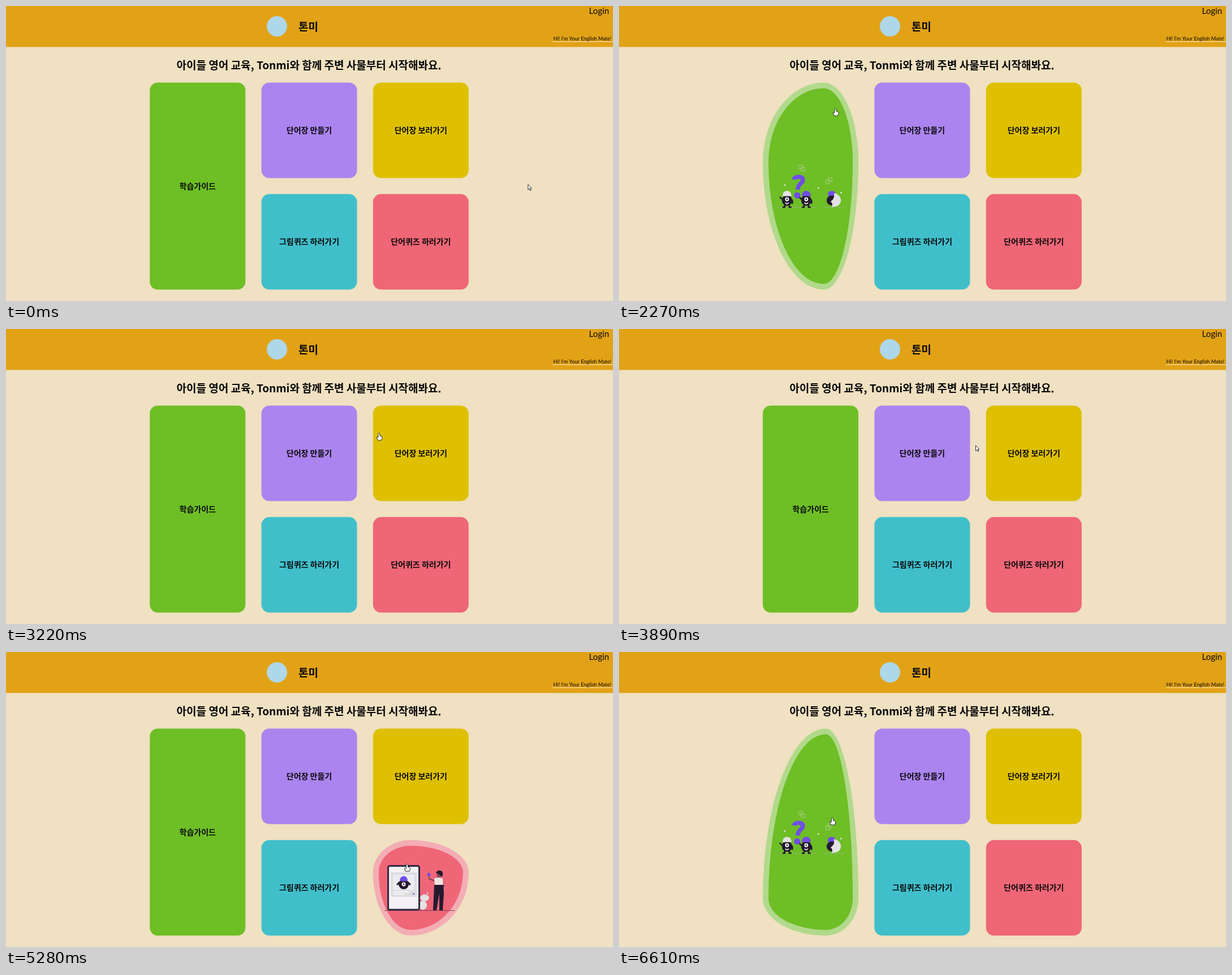
Recreate the animation shown at these times as an HTML page with a canvas. Size 1073x522 px, loop 6.68 s.

```html
<!DOCTYPE html>
<html lang="ko">
<head>
<meta charset="utf-8">
<style>
  html, body { margin: 0; width: 100%; height: 100%; overflow: hidden; background: #efe1c1; }
  canvas { display: block; }
</style>
</head>
<body>
<canvas id="stage" width="1073" height="522"></canvas>
<script>
const ctx = document.getElementById('stage').getContext('2d');
const LOOP = 6680, TAU = Math.PI * 2;
const INK = '#241a30', VIOLET = '#704ee8', PALE = '#e3e1e3', TEAL = '#40bfcb';
const KOREAN = '"Noto Sans CJK KR", "Noto Sans CJK", sans-serif';
const HOVER_DELAY = 40;

// Places the cursor glides to: arrival time, x, y
const STOPS = [
  [0, 924, 315], [400, 763, 412], [740, 930, 388], [1410, 769, 105],
  [1750, 735, 225], [2270, 383, 180], [2560, 335, 290], [2860, 383, 180],
  [3760, 735, 185], [4300, 550, 222], [4620, 552, 377], [5160, 600, 430],
  [5280, 708, 374], [5400, 740, 420], [6610, 377, 293], [LOOP, 378, 293]
];

const CARDS = [
  card(0, 0, 2, '#6ebe26', '#b1d98b', '학습가이드', drawQuestion),
  card(1, 0, 1, '#ac84ef', '#d2c0ef', '단어장 만들기'),
  card(2, 0, 1, '#dec000', '#ecdc73', '단어장 보러가기'),
  card(1, 1, 1, TEAL, '#98dade', '그림퀴즈 하러가기', drawCards),
  card(2, 1, 1, '#ef6677', '#f3adb5', '단어퀴즈 하러가기', drawPhone)
];

function card(col, row, rows, fill, rim, label, art) {
  const size = 169, step = 197.3;
  return { x: 254.2 + col * step, y: 135.5 + row * step, w: size, h: size + (rows - 1) * step, fill, rim, label, art };
}

const easeOut = p => 1 - (1 - p) ** 3;

function smooth(p) {
  p = Math.min(1, Math.max(0, p));
  return p * p * (3 - 2 * p);
}

function cursorAt(t) {
  const i = Math.max(1, STOPS.findIndex(s => s[0] >= t));
  const [t0, x0, y0] = STOPS[i - 1], [t1, x1, y1] = STOPS[i];
  const p = easeOut((t - t0) / (t1 - t0));
  return [x0 + (x1 - x0) * p, y0 + (y1 - y0) * p];
}

function cardAt(t) {
  const [x, y] = cursorAt(t);
  return CARDS.find(c => x >= c.x && x <= c.x + c.w && y >= c.y && y <= c.y + c.h);
}

function hoverAge(t) {
  const current = cardAt(t);
  let age = 0;
  while (age < t && cardAt(t - age) === current) age += 5;
  return age;
}

function paint(fill, stroke, width = 1) {
  if (fill) { ctx.fillStyle = fill; ctx.fill(); }
  if (stroke) { ctx.strokeStyle = stroke; ctx.lineWidth = width; ctx.stroke(); }
}

function shape(d, fill, stroke, width = 1) {
  const path = new Path2D(d);
  if (fill) { ctx.fillStyle = fill; ctx.fill(path); }
  if (stroke) { ctx.strokeStyle = stroke; ctx.lineWidth = width; ctx.stroke(path); }
}

function oval(x, y, rx, ry, fill, start = 0, end = TAU) {
  ctx.beginPath();
  ctx.ellipse(x, y, rx, ry, 0, start, end);
  paint(fill);
}

const dot = (x, y, r, fill) => oval(x, y, r, r, fill);
const dome = (x, y, rx, ry, fill) => oval(x, y, rx, ry, fill, Math.PI, TAU);

function box(x, y, w, h, r, fill, stroke, width) {
  ctx.beginPath();
  ctx.roundRect(x, y, w, h, r);
  paint(fill, stroke, width);
}

function at(x, y, angle, draw) {
  ctx.save();
  ctx.translate(x, y);
  ctx.rotate(angle);
  draw();
  ctx.restore();
}

function text(str, x, y, font, align = 'center') {
  ctx.font = font;
  ctx.textAlign = align;
  ctx.fillStyle = '#080808';
  ctx.fillText(str, x, y);
}

// Four quarter ellipses that meet at the peak (px) and the widest point (py)
function blob(l, t, r, b, px, py, fill) {
  ctx.beginPath();
  for (let i = 0; i < 4; i++) {
    const rx = i % 3 ? r - px : px - l, ry = i < 2 ? py - t : b - py;
    ctx.ellipse(px, py, rx, ry, 0, Math.PI + i * TAU / 4, Math.PI + (i + 1) * TAU / 4);
  }
  paint(fill);
}

function drawEye(x, y) {
  dot(x, y, 3.4, '#fff');
  dot(x, y, 1.4, INK);
}

function drawCritter(x, cap) {
  at(x, 344, 0, () => {
    shape('M-4 6v6h-4M4 6v6h4M-7 -1l-6 -5M7 -3q4 4 2 9', null, INK, 2.5);
    oval(0, 0, 9, 9.5, INK);
    dome(0, -10, 7.5, 7, cap);
    box(-8, -11, 16, 3.5, 1.5, cap);
    drawEye(0, -2);
    shape('M-3 4q3 4 6 0', null, '#fff', 1.5);
  });
}

function drawQuestion() {
  shape('M279 356.5H350M360 356.5H399', null, '#91b574');
  for (const [x, y, shift] of [[317.5, 281.5, 4], [369.5, 303.5, -4]]) {
    box(x, y, 7, 7, 0, null, '#a5cf83');
    box(x + shift, y + 4, 7, 7, 0, null, '#a5cf83');
  }
  for (const [x, y] of [[293, 317], [352.5, 322], [392.5, 330]]) dot(x, y, 1.5, PALE);
  drawCritter(297, PALE);
  drawCritter(331, VIOLET);
  shape('M309 307C310 301 326 300 325 308C324 315 316 314 316 325', null, VIOLET, 7.5);
  dot(315, 335, 5.5, VIOLET);
  oval(376, 333, 7, 6, VIOLET);
  dot(376, 344, 9, INK);
  shape('M380 331C394 334 396 348 386 354L376 356Q379 349 374 346Q382 341 380 331Z', PALE);
}

function drawBust(x, y, skin) {
  at(x, y, 0, () => {
    dome(0, -2, 6.5, 6.5, INK);
    shape('M-13 25L-11 13L-3 8H3L11 13L13 25Z', INK);
    shape('M-4 9L0 22L5 9Z', '#f3eef0');
    oval(0, 1, 4, 5.5, skin);
    shape('M-7 -10l2 -4 4 3 3 -4 4 5', null, '#79b7d5');
  });
}

function drawPlayingCard(x, y, angle, drawFace) {
  at(x, y, angle, () => {
    box(-26, -37, 52, 74, 4, TEAL, '#285d78');
    box(-17, -28, 34, 56, 0, null, '#285d78');
    for (const side of [-1, 1]) {
      dot(21.5 * side, 29 * side, 2.3, '#5b83d5');
      box(21.5 * side - 1, 29 * side, 2, 5, 0, '#5b83d5');
    }
    drawFace();
  });
}

function drawCards() {
  drawPlayingCard(568, 417, .25, () => at(-9, 0, -.12, () => drawBust(0, 0, '#dda5a4')));
  drawPlayingCard(519.5, 421.5, 0, () => {
    oval(-3, 2, 7, 8, INK);
    drawBust(-1, 3, '#78454b');
  });
  shape('M483 458.5H594', null, '#285d78');
  shape('M478 450Q486 447 487 459Q479 459 478 450Z', INK, VIOLET);
}

function drawPhone() {
  shape('M669 457.5H793', null, '#7c405a');
  oval(740, 435, 8, 6, PALE);
  oval(737, 448, 7, 8, PALE);
  dot(745, 427, 1.5, PALE);
  box(675.5, 378.5, 55, 77.5, 3, '#f3f1f4', '#302842', 3);
  box(680, 390, 46, 43, 1, '#dcdce1');
  box(684, 394, 38, 27, 0, '#ececf0');
  shape('M684 424.5H711M684 428.5H704', null, '#f8f8fa', 2);
  shape('M719 428h3', null, VIOLET, 2);

  dot(703, 411, 9, INK);
  shape('M696 407l-5 5M710 407l5 5', null, INK, 3);
  dome(703, 403, 6.5, 6.5, VIOLET);
  box(696, 401.5, 14, 4, 2, VIOLET);
  drawEye(703, 411);

  const skin = '#8b4a55';
  shape('M758 405L747 401M771 403L774 416', null, skin, 2.5);
  shape('M748 401V394', null, skin, 1.5);
  box(745, 391, 5, 6, 1, VIOLET);
  oval(765.5, 394, 4, 7, skin);
  shape('M760 391Q762 385 769 387Q774 390 771 398L766 394Z', INK);
  shape('M757 401Q765 397 772 401L773 412H758Z', '#f0e4e2');
  shape('M757 412H773L774 427L772 457H766V427L761 457H755Z', INK);
}

function drawCard({ x, y, w, h, fill, rim, label, art }, age) {
  if (age < HOVER_DELAY) {
    box(x, y, w, h, 14, fill);
    text(label, x + w / 2, y + h / 2 + 5, `900 14px ${KOREAN}`);
    return;
  }
  const px = x + w * (.3 + .36 * smooth(age / 300));
  const py = y + h * (.34 + .48 * smooth((age - 180) / 400));
  blob(x, y, x + w, y + h, px, py, rim);
  blob(x + 10, y + 10, x + w - 10, y + h - 10, px, py, fill);
  if (art) art();
}

function drawCursor(t, overCard) {
  const [x, y] = cursorAt(t);
  at(x, y, 0, () => {
    if (overCard) shape('M-1.5 7V1Q0 -1 1.5 1V5L5 6Q6 7 5.5 10L4 13H-2L-4.5 8Q-4 6 -1.5 8Z', '#fff', '#222');
    else shape('M0 0V9.5L2.3 7.5L4 11L5.3 10.4L3.8 7H6.5Z', '#fff', '#303040');
  });
}

function drawPage() {
  ctx.fillStyle = '#efe1c1';
  ctx.fillRect(0, 0, 1073, 522);
  ctx.fillStyle = '#e2a216';
  ctx.fillRect(0, 0, 1073, 72.5);
  dot(479, 36, 18, '#aed7ea');
  text('톤미', 534.5, 43.5, `900 19px ${KOREAN}`);
  text('Login', 1066, 14, '15px Lato, sans-serif', 'right');
  text("Hi! I'm Your English Mate!", 1070, 61, '9.1px Lato, sans-serif', 'right');
  ctx.fillStyle = '#f5dfae';
  ctx.fillRect(966, 62.5, 107, 1.2);
  text('아이들 영어 교육, Tonmi와 함께 주변 사물부터 시작해봐요.', 535.5, 111.5, `900 19px ${KOREAN}`);
}

function frame(now) {
  const t = now % LOOP;
  const hovered = cardAt(t), age = hoverAge(t);
  drawPage();
  for (const c of CARDS) drawCard(c, c === hovered ? age : 0);
  drawCursor(t, hovered);
  requestAnimationFrame(frame);
}
requestAnimationFrame(frame);
</script>
</body>
</html>
```
